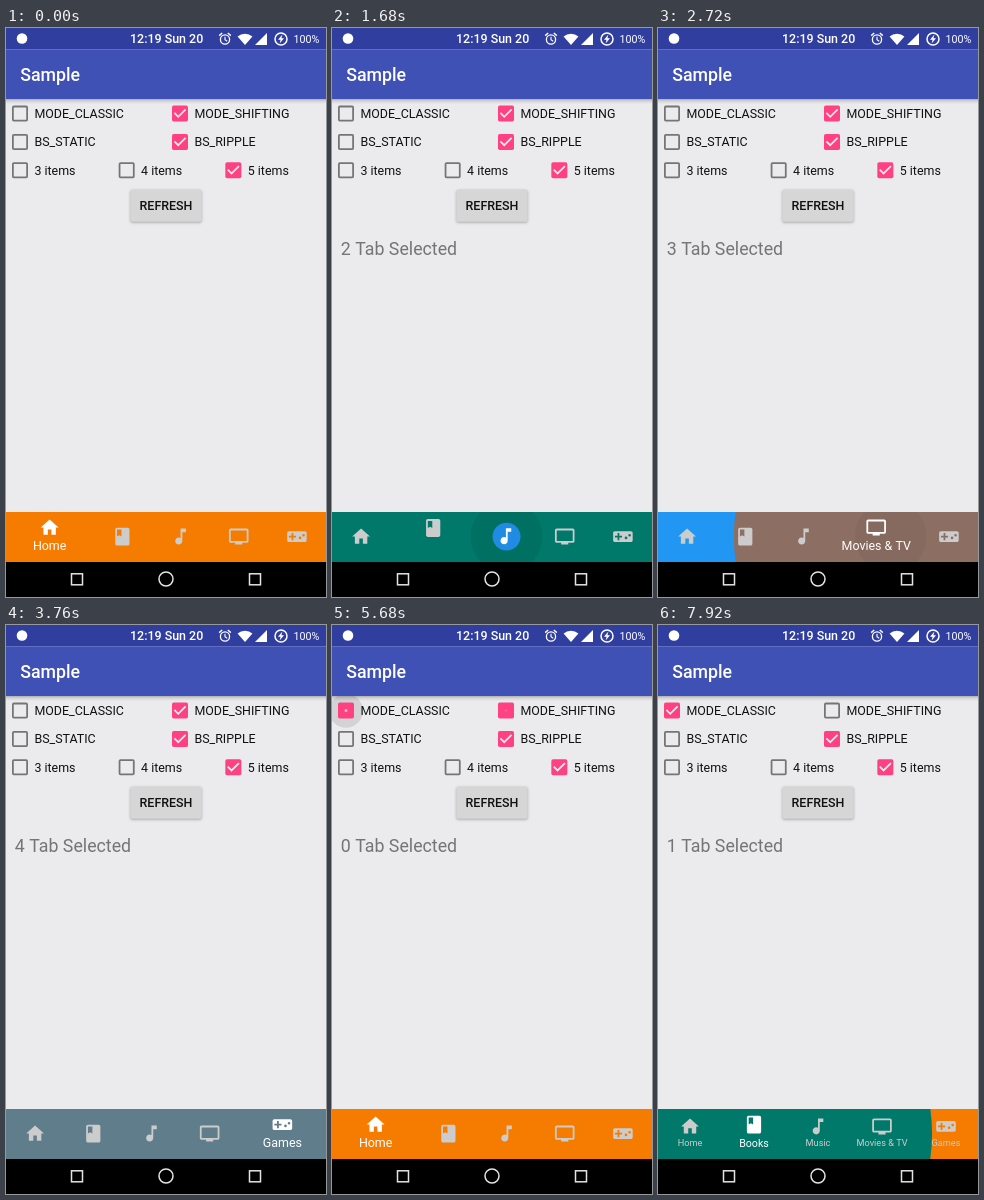
Recreate the animation shown at these times as an HTML page with a canvas. Size 320 by 569 pixels, loop 8 s.

```html
<!DOCTYPE html>
<html lang="en">
<head>
<meta charset="utf-8">
<title>Bottom navigation sample</title>
<style>
  html, body { margin: 0; width: 100%; height: 100%; overflow: hidden; background: #000; }
  canvas { display: block; width: 320px; height: 569px; }
</style>
</head>
<body>
<canvas id="stage"></canvas>
<script>
const W = 320, H = 569, LOOP = 8000, STEP = 80, DP = 320 / 360;
const BAR_TOP = 484, BAR_H = 50, CLASSIC_AT = 6320, CHECK_AT = 5560;
const BG = '#ebeaed', PINK = [255, 64, 129], GRAY = [117, 117, 117];

const canvas = document.getElementById('stage');
const ctx = canvas.getContext('2d');
const ratio = window.devicePixelRatio || 1;
canvas.width = W * ratio;
canvas.height = H * ratio;

const tabs = [
  { name: 'Home', color: '#f57c00', icon: 'M10 20v-6h4v6h5v-8h3L12 3 2 12h3v8z' },
  { name: 'Books', color: '#00796b', icon: 'M18 2H6c-1.1 0-2 .9-2 2v16c0 1.1.9 2 2 2h12c1.1 0 2-.9 2-2V4c0-1.1-.9-2-2-2zM6 4h5v8l-2.5-1.5L6 12V4z' },
  { name: 'Music', color: '#2196f3', icon: 'M12 3v10.55c-.59-.34-1.27-.55-2-.55-2.21 0-4 1.79-4 4s1.79 4 4 4 4-1.79 4-4V7h4V3h-6z' },
  { name: 'Movies & TV', color: '#8d6e63', icon: 'M21 3H3c-1.1 0-2 .9-2 2v12c0 1.1.9 2 2 2h5v2h8v-2h5c1.1 0 2-.9 2-2V5c0-1.1-.9-2-2-2zm0 14H3V5h18v12z' },
  { name: 'Games', color: '#607d8b', icon: 'M21 6H3c-1.1 0-2 .9-2 2v8c0 1.1.9 2 2 2h18c1.1 0 2-.9 2-2V8c0-1.1-.9-2-2-2zm-10 7H8v3H6v-3H3v-2h3V8h2v3h3v2zm4.5 2a1.5 1.5 0 1 1 0-3 1.5 1.5 0 0 1 0 3zm4-3a1.5 1.5 0 1 1 0-3 1.5 1.5 0 0 1 0 3z' }
];
for (const tab of tabs) tab.path = new Path2D(tab.icon);

// press: finger down, start: reveal begins
const taps = [
  { tab: 0, start: -9999 },
  { tab: 1, press: 560, start: 655 },
  { tab: 2, press: 1440, start: 1613 },
  { tab: 3, press: 2400, start: 2473 },
  { tab: 4, press: 3200, start: 3310 },
  { tab: 0, press: 4240, start: 4303 },
  { tab: 1, start: 7652 }
];
const UI_DELAY = 40;

const clamp = v => Math.max(0, Math.min(1, v));
const ease = v => (1 - Math.cos(Math.PI * clamp(v))) / 2;
const lerp = (a, b, k) => a + (b - a) * k;
const black = a => `rgba(0,0,0,${a})`;

function rect(x, y, w, h, color) {
  ctx.fillStyle = color;
  ctx.fillRect(x, y, w, h);
}

function disc(x, y, r, color) {
  ctx.fillStyle = color;
  ctx.beginPath();
  ctx.arc(x, y, r, 0, 7);
  ctx.fill();
}

function ring(x, y, r, width, color) {
  ctx.strokeStyle = color;
  ctx.lineWidth = width;
  ctx.beginPath();
  ctx.arc(x, y, r, 0, 7);
  ctx.stroke();
}

function poly(points, color, width) {
  ctx.beginPath();
  points.forEach(([x, y]) => ctx.lineTo(x, y));
  if (width) {
    ctx.strokeStyle = color;
    ctx.lineWidth = width;
    ctx.stroke();
  } else {
    ctx.fillStyle = color;
    ctx.fill();
  }
}

function text(str, x, y, size, color, weight = 400, align = 'left') {
  ctx.font = `${weight} ${size}px Roboto, "Noto Sans", sans-serif`;
  ctx.textAlign = align;
  ctx.fillStyle = color;
  ctx.fillText(str, x, y);
}

function clipped(x, y, w, h, draw) {
  ctx.save();
  ctx.beginPath();
  ctx.rect(x, y, w, h);
  ctx.clip();
  draw();
  ctx.restore();
}

function statusBar() {
  rect(0, 0, W, 21.3, '#303f9f');
  disc(16, 10.5, 5.3, '#fff');
  text('12:19 Sun 20', 124, 15.2, 14 * DP, '#fff', 500);
  // alarm
  ring(219, 11.5, 4.6, 1.3, '#fff');
  poly([[219, 8.8], [219, 11.8], [221.2, 13.2]], '#fff', 1.1);
  poly([[213.2, 7.6], [216.2, 5]], '#fff', 1.4);
  poly([[224.8, 7.6], [221.8, 5]], '#fff', 1.4);
  // wifi
  ctx.fillStyle = '#fff';
  ctx.beginPath();
  ctx.moveTo(239, 17);
  ctx.arc(239, 17, 11.2, -Math.PI * 0.73, -Math.PI * 0.27);
  ctx.fill();
  poly([[261, 5], [261, 17], [249, 17]], '#fff');
  // charging
  ring(275, 11, 6, 1.5, '#fff');
  poly([[276.4, 6.6], [272, 11.8], [274.6, 11.8], [273.6, 15.4], [278, 10.2], [275.4, 10.2]], '#fff');
  text('100%', 287.5, 14.8, 12 * DP, '#fff');
}

function toolbar() {
  const shade = ctx.createLinearGradient(0, 71, 0, 76);
  shade.addColorStop(0, black(0.26));
  shade.addColorStop(0.4, black(0.1));
  shade.addColorStop(1, black(0));
  rect(0, 71, W, 5, shade);
  rect(0, 21.3, W, 49.7, '#3f51b5');
  text('Sample', 14.2, 52.8, 20 * DP, '#fff', 500);
}

function checkbox(label, x, y, on) {
  const fill = clamp(on * 2), mark = clamp(on * 2 - 1);
  const inner = 7 * (1 - fill);
  const tint = GRAY.map((v, i) => Math.round(lerp(v, PINK[i], clamp(fill * 2))));
  ctx.save();
  ctx.translate(x, y);
  ctx.scale(DP, DP);
  ctx.fillStyle = `rgb(${tint})`;
  ctx.beginPath();
  ctx.roundRect(-9, -9, 18, 18, 2);
  if (inner > 0) ctx.rect(-inner, -inner, inner * 2, inner * 2);
  ctx.fill('evenodd');
  if (mark > 0) {
    ctx.scale(mark, mark);
    poly([[-6.3, -0.7], [-2, 3.6], [6.3, -4.7]], BG, 2);
  }
  ctx.restore();
  text(label, x + 14.4, y + 4.4, 14 * DP, '#111');
}

function options(t) {
  const swap = clamp((t - CHECK_AT) / 300);
  if (t >= 5520 && t < 5920) {
    const grow = clamp((t - 5440) / 160);
    const fade = 1 - clamp((t - 5680) / 240);
    clipped(0, 71, W, 60, () => disc(14, 85.8, 17 * grow, black(0.1 * fade)));
  }
  checkbox('MODE_CLASSIC', 14, 85.6, swap);
  checkbox('MODE_SHIFTING', 174, 85.6, 1 - swap);
  checkbox('BS_STATIC', 14, 114, 0);
  checkbox('BS_RIPPLE', 174, 114, 1);
  [3, 4, 5].forEach((n, i) => checkbox(n + ' items', 14 + i * W / 3, 142.3, n === 5 ? 1 : 0));
}

function button(t) {
  const press = t < 6160 ? 0 : clamp((t - 6080) / 160) * (1 - clamp((t - 6400) / 400));
  ctx.save();
  ctx.shadowColor = black(0.28 + 0.12 * press);
  ctx.shadowBlur = (2.5 + 3 * press) * ratio;
  ctx.shadowOffsetY = (1 + press) * ratio;
  const tone = Math.round(214 - 17 * press);
  ctx.fillStyle = `rgb(${tone},${tone},${tone})`;
  ctx.beginPath();
  ctx.roundRect(124.3, 161.5, 71.4, 32.3, 1.8);
  ctx.fill();
  ctx.restore();
  text('REFRESH', 160, 182.4, 14 * DP, '#111', 500, 'center');
}

function tabLabel(name, x, y, size, scale, color) {
  if (scale <= 0) return;
  ctx.save();
  ctx.translate(x, y);
  ctx.scale(scale, scale);
  text(name, 0, size * 0.35, size, color, 400, 'center');
  ctx.restore();
}

function bottomBar(t, n) {
  const tap = taps[n], prev = n ? taps[n - 1].tab : -1;
  const classic = t >= CLASSIC_AT;
  const move = ease((t - tap.start - UI_DELAY) / 200);
  const unit = W / 5.5;
  const share = i => i === tap.tab ? move : i === prev ? 1 - move : 0;

  rect(0, BAR_TOP, W, BAR_H, tabs[n ? prev : 0].color);
  clipped(0, BAR_TOP, W, BAR_H, () => {
    const mid = BAR_TOP + 24.6;
    const origin = classic ? (tap.tab + 0.5) * W / 5
      : (tap.tab + 0.5 + (prev >= 0 && prev < tap.tab ? 0.5 : 0)) * unit;
    const reach = (t - tap.start) / 500;
    if (reach >= 1) rect(0, BAR_TOP, W, BAR_H, tabs[tap.tab].color);
    else disc(origin, mid, W * ease(reach), tabs[tap.tab].color);

    // touch feedback
    for (let k = 1; k < taps.length; k++) {
      const { press, start, tab } = taps[k];
      if (!(t >= press && t < start + 430)) continue;
      const x = (tab + 0.5 + (taps[k - 1].tab < tab ? 0.5 : 0)) * unit;
      const alpha = 0.07 * (1 - clamp((t - start - 100) / 330));
      disc(x, mid, lerp(31, 36, clamp((t - press) / 200)), black(alpha));
    }
  });

  let left = 0;
  tabs.forEach((tab, i) => {
    const k = share(i);
    const width = classic ? W / 5 : unit * (1 + 0.5 * k);
    const x = left + width / 2;
    left += width;
    const color = i === tap.tab ? '#fff' : '#ccc';
    const y = BAR_TOP + (classic ? lerp(17.4, 15.6, k) : lerp(24.6, 15.6, k));
    ctx.save();
    ctx.translate(x, y);
    ctx.scale(DP, DP);
    ctx.translate(-12, -12);
    ctx.fillStyle = color;
    ctx.fill(tab.path, 'evenodd');
    ctx.restore();
    if (classic) tabLabel(tab.name, x, 518, 12 * DP, lerp(0.86, 1, k), color);
    else if (i === tap.tab) tabLabel(tab.name, x, 517.6, 14 * DP, k, color);
  });
}

function systemKeys() {
  rect(0, 534, W, 35, '#000');
  ctx.strokeStyle = '#e4e4e4';
  ctx.lineWidth = 1.5;
  for (const x of [65.5, 243.5]) ctx.strokeRect(x, 545.8, 11, 11);
  ring(160, 551, 7, 1.5, '#e4e4e4');
}

function draw(t) {
  ctx.setTransform(ratio, 0, 0, ratio, 0, 0);
  rect(0, 0, W, H, BG);
  let n = 0;
  while (n + 1 < taps.length && t >= taps[n + 1].start + UI_DELAY) n++;
  options(t);
  button(t);
  if (n) text(taps[n].tab + ' Tab Selected', 8.8, 227, 20 * DP, '#757575');
  statusBar();
  toolbar();
  bottomBar(t, n);
  systemKeys();
}

const begin = performance.now();
function tick() {
  const t = (performance.now() - begin) % LOOP;
  draw(Math.floor(t / STEP) * STEP);
  requestAnimationFrame(tick);
}
tick();
</script>
</body>
</html>
```
